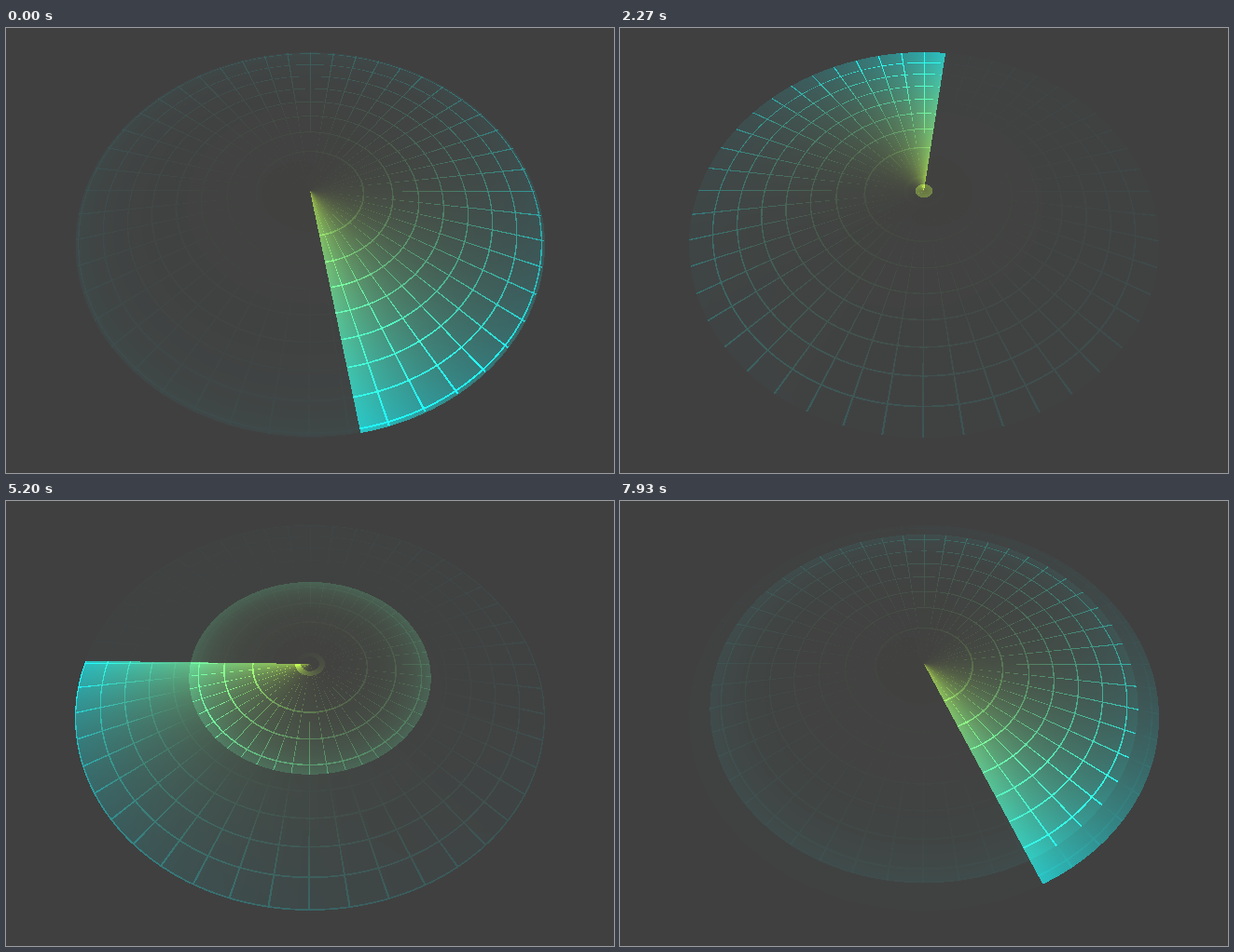
Animation, 652 px wide and 478 px high, one loop 8 s. Source, as an HTML page with a canvas:

```html
<!DOCTYPE html>
<html lang="en">
<head>
<meta charset="utf-8">
<title>Radar sweep</title>
<style>
  html, body { margin: 0; width: 100%; height: 100%; overflow: hidden; background: #404040; }
  canvas { display: block; }
</style>
</head>
<body>
<canvas id="stage" width="652" height="478"></canvas>
<script>
const canvas = document.getElementById('stage');
const ctx = canvas.getContext('2d');
const W = canvas.width, H = canvas.height;

const LOOP = 8000, FPS = 15;
const BG = 64;
const TAU = Math.PI * 2;

// Tilted unit disc: x = CX + SX*u/(1-K*v), y = CY + SY*v/(1-K*v)
const CX = 326, CY = 175, SX = 241.9, SY = 190.7, K = 0.2802;

const SPOKES = 48, LINE = 0.052, ROLL = 0.003;
const RING_DENSITY = 10.55, RING_HEIGHT = 0.27;
const PULSE_MS = 2000, PULSE_REACH = 1.055;
const INNER = [205, 250, 75], OUTER = [30, 252, 255];

const frac = n => n - Math.floor(n);
const nearLine = n => Math.abs(n - Math.round(n)) < LINE / 2;

// Everything about a pixel that never changes
const dots = [];
for (let y = 0; y < H; y++) {
  for (let x = 0; x < W; x++) {
    const s = y + 0.5 - CY;
    const v = s / (SY + K * s);
    const u = (x + 0.5 - CX) * (1 - K * v) / SX;
    const r = Math.hypot(u, v);
    if (r > 1) continue;
    const turn = frac(Math.atan2(-u, v) / TAU);
    dots.push({
      at: (y * W + x) * 4,
      r,
      turn,
      spoke: nearLine((turn - ROLL / TAU) * SPOKES),
      ring: RING_DENSITY * Math.hypot(r, RING_HEIGHT),
      tint: INNER.map((c, i) => c + (OUTER[i] - c) * r - BG)
    });
  }
}

// Fade tables, by tenths of a degree behind the arm
const fade = (peak, degrees) =>
  Float32Array.from({ length: 3601 }, (_, i) => peak * Math.exp(-i / 10 / degrees));
const fillFade = fade(0.68, 30);
const lineFade = fade(1, 85);

const image = ctx.createImageData(W, H);
const px = image.data;
for (let i = 0; i < px.length; i += 4) {
  px[i] = px[i + 1] = px[i + 2] = BG;
  px[i + 3] = 255;
}

function draw(ms) {
  // The clock starts slightly ahead and settles
  const t = ms + 85 * Math.max(0, 1 - ms / 800);
  const arm = t / 4000 - 17 / 360;
  const ringShift = t / 1000 + 0.706;
  const pulse = frac((t - 195) / PULSE_MS) * PULSE_REACH;
  const glow = 0.015 + 0.36 * Math.pow(1 - pulse / PULSE_REACH, 1.1);

  for (const d of dots) {
    const behind = frac(arm - d.turn) * 3600 | 0;
    const gap = pulse - d.r;
    const age = gap < 0 ? gap + PULSE_REACH : gap;
    let alpha = 0.01 + fillFade[behind];
    if (gap >= 0) alpha += glow * Math.exp(-gap / 0.12);
    if (d.spoke || nearLine(d.ring - ringShift)) {
      alpha += lineFade[behind] * (1 - age / PULSE_REACH);
    }
    if (alpha > 1) alpha = 1;
    const { at, tint } = d;
    px[at] = BG + tint[0] * alpha;
    px[at + 1] = BG + tint[1] * alpha;
    px[at + 2] = BG + tint[2] * alpha;
  }
  ctx.putImageData(image, 0, 0);
}

const start = performance.now();
let shown = -1;
function tick() {
  const ms = (performance.now() - start) % LOOP;
  const step = Math.floor((ms + 4) * FPS / 1000) % (LOOP * FPS / 1000);
  if (step !== shown) {
    shown = step;
    draw(step * 1000 / FPS);
  }
  requestAnimationFrame(tick);
}
tick();
</script>
</body>
</html>
```
